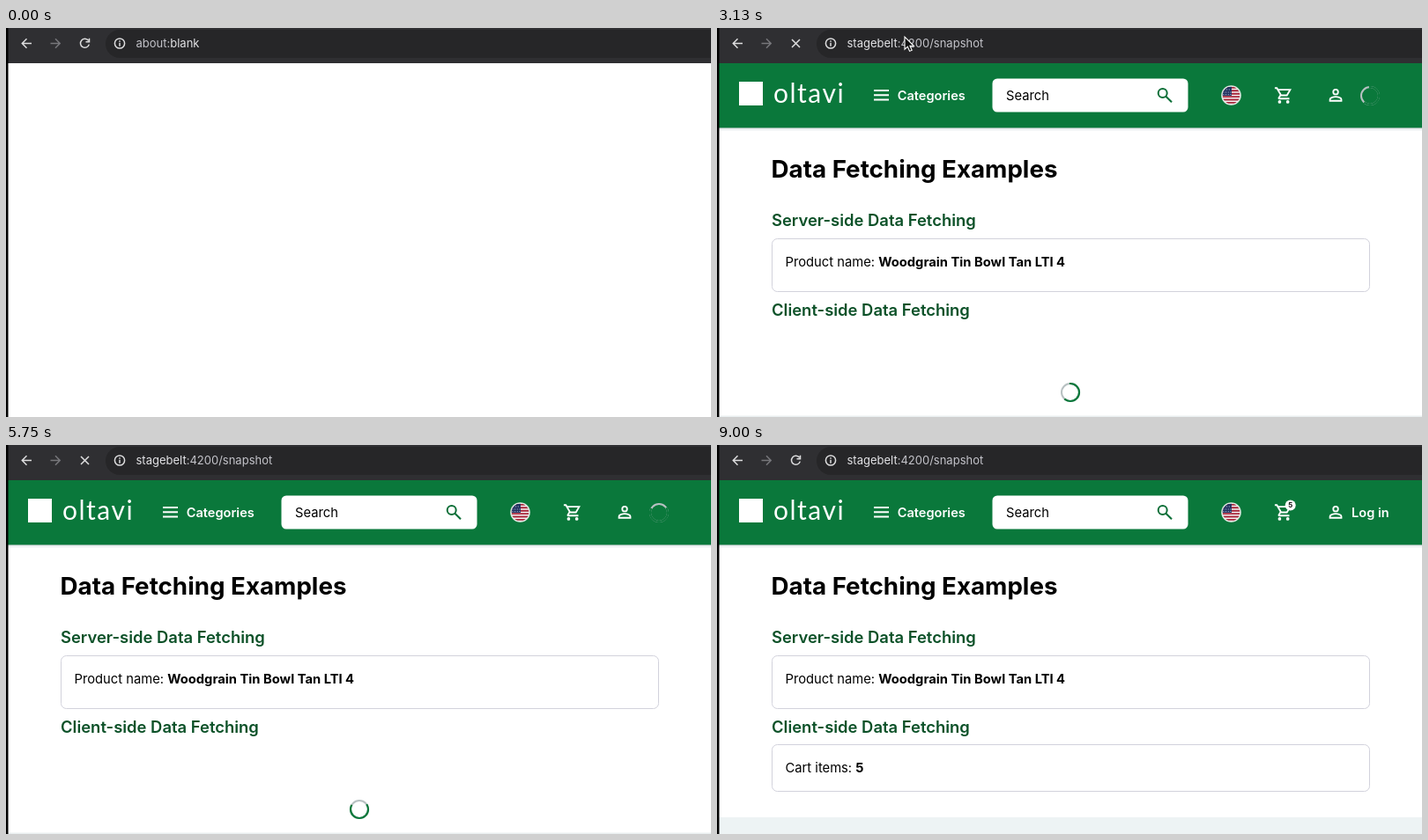
An HTML page that plays this animation: 800x442 px, repeating every 9.13 s.

```html
<!DOCTYPE html>
<html lang="en">
<head>
<meta charset="utf-8">
<title>Data fetching demo</title>
<style>
  html, body { margin: 0; width: 100%; height: 100%; overflow: hidden; background: #fff; }
  svg { display: block; width: 800px; height: 442px; }
  text { font-family: Inter, "Open Sans", sans-serif; font-optical-sizing: none; white-space: pre; }
  .ui { font-size: 13px; fill: #e3e3e6; }
  .dim { fill: #c4c4ca; }
  .bold { font-weight: 700; }
  .page { font-size: 14.75px; fill: #000; }
  .h1 { font-size: 27.75px; font-weight: 700; fill: #000; }
  .h2 { font-size: 18.43px; font-weight: 600; fill: #0c5128; }
  .nav { font-size: 14.6px; font-weight: 600; fill: #fff; }
  .logo { font: 400 30px Lato, sans-serif; letter-spacing: 1.5px; fill: #fff; }
  .line { fill: none; stroke: #dededf; stroke-width: 1.5; }
  .white { fill: none; stroke: #fff; stroke-width: 2; }
  .card { fill: #fff; stroke: #d2d2dc; }

  .scene, .arc, .pointer { animation: 9.13s step-end infinite; }
  .start { animation-name: start; }
  .menu { animation-name: menu; }
  .address { animation-name: address; }
  .idle { animation-name: idle; }
  .busy { animation-name: busy; }
  .site { animation-name: site; }
  .wait { animation-name: wait; }
  .done { animation-name: done; }
  @keyframes start { 0% { visibility: visible } 13.69%, 100% { visibility: hidden } }
  @keyframes menu { 0%, 24.64%, 100% { visibility: hidden } 13.69% { visibility: visible } }
  @keyframes address { 0% { visibility: hidden } 24.64%, 100% { visibility: visible } }
  @keyframes idle { 0%, 82.15%, 100% { visibility: visible } 24.64% { visibility: hidden } }
  @keyframes busy { 0%, 82.15%, 100% { visibility: hidden } 24.64% { visibility: visible } }
  @keyframes site { 0% { visibility: hidden } 27.38%, 100% { visibility: visible } }
  @keyframes wait { 0%, 82.15%, 100% { visibility: hidden } 27.38% { visibility: visible } }
  @keyframes done { 0% { visibility: hidden } 82.15%, 100% { visibility: visible } }

  .ring { fill: none; stroke: #b8c1c2; stroke-width: 2; }
  .arc {
    fill: none; stroke: #0a783b; stroke-width: 2.2; stroke-linecap: square;
    animation-name: arc; animation-timing-function: ease-in-out;
  }
  /* the arc grows from the top, then its tail catches up, every 2 s */
  @keyframes arc {
    0%, 27% { stroke-dasharray: 0 100; stroke-dashoffset: 0 }
    37.95% { stroke-dasharray: 78 22; stroke-dashoffset: 0 }
    48.9% { stroke-dasharray: 0 100; stroke-dashoffset: -100 }
    59.86% { stroke-dasharray: 78 22; stroke-dashoffset: -100 }
    70.81% { stroke-dasharray: 0 100; stroke-dashoffset: -200 }
    81.76%, 100% { stroke-dasharray: 78 22; stroke-dashoffset: -200 }
  }
  .pointer { animation-name: pointer; animation-timing-function: ease-out; }
  @keyframes pointer {
    0%, 5.5% { transform: translate(250px, -30px) }
    10.95%, 41% { transform: translate(213px, 10px) }
    45.2%, 100% { transform: translate(222px, -30px) }
  }
</style>
</head>
<body>
<svg viewBox="0 0 800 442">
  <defs>
    <filter id="soft" x="-10%" y="-30%" width="120%" height="170%">
      <feDropShadow dx="0" dy="3" stdDeviation="4" flood-color="#34347a" flood-opacity=".5"/>
    </filter>
    <clipPath id="round"><circle r="10"/></clipPath>
  </defs>
  <rect width="800" height="442" fill="#fff"/>

  <!-- web page -->
  <g class="scene site">
    <rect y="113" width="800" height="1.5" fill="#c6ced0"/>
    <rect y="114.5" width="800" height="2" fill="#eff1f4"/>
    <rect y="40" width="800" height="73.4" fill="#0a783b"/>
    <rect x="25" y="61" width="27" height="27" fill="#fff"/>
    <text class="logo" x="64" y="84.7">oltavi</text>
    <path class="white" d="M178 71h17M178 76.2h17M178 81.4h17"/>
    <text class="nav" x="204.7" y="81.5">Categories</text>
    <rect x="312.5" y="57.5" width="222" height="38" rx="5.5" fill="#fff"/>
    <text class="page" x="328" y="81.8">Search</text>
    <g fill="none" stroke="#0d6f38" stroke-width="2"><circle cx="505.7" cy="74" r="5"/><path d="M509.4 77.7l6.6 6.6"/></g>

    <g transform="translate(583.5 76.5)">
      <circle r="11.3" fill="#dfe9e2"/>
      <g clip-path="url(#round)">
        <rect x="-10" y="-10" width="20" height="20" fill="#f4f4f4"/>
        <path d="M-10-8.6h20M-10-5.2h20M-10-1.8h20M-10 1.6h20M-10 5h20M-10 8.4h20" stroke="#a8263a" stroke-width="1.9"/>
        <rect x="-10" y="-10" width="10.5" height="10.5" fill="#20305f"/>
        <path d="M-8-6.5h8M-9-3.5h9M-9-.9h9" stroke="#c9d0e4" stroke-dasharray="1 1.6"/>
      </g>
    </g>

    <g transform="translate(632 65.5) scale(.92)">
      <path class="white" d="M1 3h2.6l5.2 9h7.2l4-7H4.6M8 12l-2 3.2c-.3.5 0 .8.6.8H19"/>
      <circle cx="7" cy="20" r="2" fill="#fff"/><circle cx="17" cy="20" r="2" fill="#fff"/>
    </g>
    <g class="white" transform="translate(691 65.3) scale(.92)">
      <circle cx="12" cy="8" r="3"/>
      <path d="M5 19v-2c0-2 4.5-3.1 7-3.1s7 1.1 7 3.1v2z"/>
    </g>

    <text class="h1" x="61.5" y="169.5">Data Fetching Examples</text>
    <text class="h2" x="62" y="225">Server-side Data Fetching</text>
    <rect class="card" x="62.5" y="239.5" width="678" height="60" rx="6"/>
    <text class="page" x="77.5" y="271">Product name: <tspan class="bold">Woodgrain Tin Bowl Tan LTI 4</tspan></text>
    <text class="h2" x="62" y="326.7">Client-side Data Fetching</text>
  </g>

  <g class="scene wait">
    <g transform="translate(741 77) rotate(-90)">
      <circle class="ring" r="10"/><circle class="arc" r="10" pathLength="100"/>
    </g>
    <g transform="translate(401 414) rotate(-90)">
      <circle class="ring" r="10"/><circle class="arc" r="10" pathLength="100"/>
    </g>
    <rect y="440.5" width="800" height="1.5" fill="#e9eff0"/>
  </g>

  <g class="scene done">
    <circle cx="650.7" cy="68.5" r="6" fill="#fff"/>
    <text x="650.7" y="71.4" font-size="8" font-weight="700" text-anchor="middle" fill="#111">5</text>
    <text class="nav" x="720" y="81.5">Log in</text>
    <rect class="card" x="62.5" y="340.5" width="678" height="53" rx="6"/>
    <text class="page" x="77.5" y="372.4">Cart items: <tspan class="bold">5</tspan></text>
    <rect y="423" width="800" height="19" fill="#edf3f4"/>
  </g>

  <!-- browser bar -->
  <rect width="800" height="40" fill="#2f2f32"/>
  <rect x="113" y="2" width="720" height="32" rx="16" fill="#262628"/>
  <path class="line" d="M29 17.5H18.5M23.5 12.3l-5.2 5.2 5.2 5.2"/>
  <path class="line" d="M50.5 17.5H61M56 12.3l5.2 5.2-5.2 5.2" style="stroke:#77777b"/>
  <g class="scene idle">
    <path class="line" d="M93.6 14.4A5 5 0 1 0 94.3 18.6M94.5 11.8v4h-4"/>
  </g>
  <path class="line scene busy" d="M85 13l9 9M94 13l-9 9"/>
  <circle class="line" cx="129" cy="17.5" r="5.6"/>
  <path class="line" d="M129 16.7v4M129 14.2v1.5"/>
  <text class="ui scene start" x="147.5" y="22"><tspan class="dim">about:</tspan>blank</text>
  <text class="ui scene address" x="147.5" y="22">stagebelt<tspan class="dim">:4200/snapshot</tspan></text>

  <!-- suggestions -->
  <g class="scene menu">
    <path d="M108 0H820V119H122a14 14 0 0 1-14-14z" fill="#29292d" filter="url(#soft)"/>
    <rect x="108" y="38" width="692" height="37" fill="#404045"/>
    <rect x="108" y="38" width="3.5" height="37" fill="#6d9df0"/>
    <rect x="128" y="10" width="15.5" height="15.5" fill="#16d45c"/>
    <rect x="128" y="48.5" width="15.5" height="15.5" fill="#16d45c"/>
    <text class="ui" x="159.5" y="22"><tspan class="dim">http://</tspan>stagebelt<tspan class="dim">:4200/snapshot</tspan></text>
    <rect x="349.5" y="9.5" width="1" height="16" fill="#f2f2f2"/>

    <text class="ui" x="159.5" y="61">Oltavi Shopfitter</text>
    <text class="ui dim" x="265" y="61">–</text>
    <text class="ui bold" x="276" y="61" style="fill:#a5c6f6">http://stagebelt:4200/snapshot</text>
    <rect x="493.5" y="44.5" width="142" height="24" rx="9" fill="none" stroke="#2c6285"/>
    <rect x="502.5" y="52" width="10.5" height="8.8" rx="1" fill="none" stroke="#a5c6f6" stroke-width="1.4"/>
    <rect x="508" y="52" width="5" height="3.4" fill="#a5c6f6"/>
    <text class="ui" x="522" y="61">Switch to this tab</text>

    <g class="line"><circle cx="134" cy="91.5" r="3.3"/><path d="M136.5 94l4 4"/></g>
    <text class="ui" x="159.5" y="98">http://stagebelt:4200/snapshot</text>
    <text class="ui dim" x="353" y="98">– Quenlo Search</text>
  </g>

  <rect width="2.5" height="442" fill="#000"/>
  <path class="pointer" d="M0 0v14.2l3.3-3 2.3 5.2 2.6-1.1-2.3-5h4.4z" fill="#111" stroke="#fff" stroke-width="1.1"/>
</svg>
</body>
</html>
```
